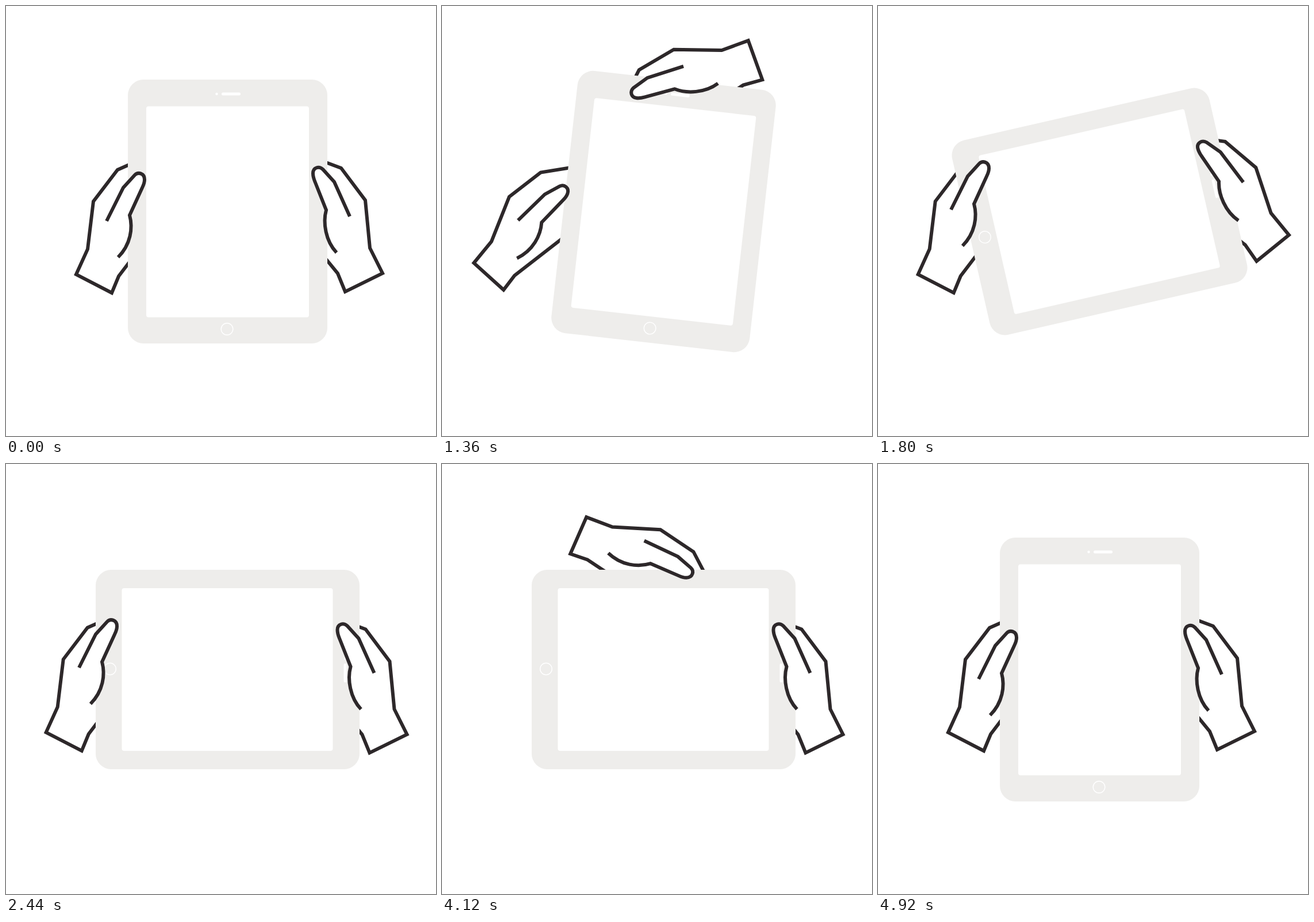
Animation, 748 px wide and 748 px high, one loop 5960 ms. Source, as an HTML page:

```html
<!DOCTYPE html>
<html lang="en">
<head>
<meta charset="utf-8">
<title>Turning a tablet</title>
<style>
  html, body { margin: 0; width: 100%; height: 100%; overflow: hidden; background: #fff; }
  svg { display: block; width: 100%; height: 100%; }
  .hand { fill: none; stroke: #2d282a; stroke-width: 6; stroke-miterlimit: 8; }
  .thumb { fill: #fff; }
</style>
</head>
<body>
<svg viewBox="0 0 748 748">
  <path id="leftPalm" class="hand" d="M266 253L194 285L152 340L142 423L122 467L184 499L196 470L260 386"/>
  <path id="rightPalm" class="hand" d="M523 259.5L583 282L625 338L633 421L655 465L590 497L577 465L505 377"/>
  <g id="tablet">
    <rect x="212" y="128" width="347" height="459" rx="27" fill="#eeedeb"/>
    <rect x="244" y="174.5" width="283" height="367" rx="4" fill="#fff"/>
    <circle cx="366.5" cy="153" r="2.2" fill="#fff"/>
    <rect x="375" y="150.5" width="33" height="5" rx="2.5" fill="#fff"/>
    <circle cx="384.5" cy="562" r="10.3" fill="none" stroke="#fff" stroke-width="1.4"/>
  </g>
  <path id="leftThumb" class="hand thumb" d="M175 374L204 316L224 294C230 288 241 291 241 302C241 308 239 312 237 316L215 364C221 386 217 415 195 437"/>
  <path id="rightThumb" class="hand thumb" d="M598 366L571 306L551 284C544 278 534 281 534 291C534 298 536 302 538 307L557 355C551 377 556 409 575 429"/>
</svg>
<script>
const LOOP = 5960, STEP = 40;
const CX = 385.5, CY = 357.5;
const TURN = [1320, 1880], BACK = [4168, 4838];
const GRAB = 1360; // right hand takes hold just after the turn begins

// Rest poses in portrait: x, y, angle
const rest = {
  leftPalm: [165, 414, 0],
  leftThumb: [197.25, 372.75, 0],
  rightPalm: [610.5, 411.3, 0],
  rightThumb: [575.25, 364, 0]
};

// Landscape poses
const wide = {
  leftPalm: [112.7, 413.8, 0],
  leftThumb: [149.25, 353, 0],
  rightPalm: [653, 416.8, 0],
  rightThumb: [617.75, 361.5, 0]
};

// Offsets of the left hand along the tablet while it turns back: halfway, start
const slide = {
  leftPalm: [[7.4, -29], [7, -12]],
  leftThumb: [[0, -28], [0, -12]]
};

const clamp01 = v => Math.max(0, Math.min(1, v));
const part = (t, [a, b]) => clamp01((t - a) / (b - a));
const tilt = t => 90 * (part(t, TURN) - part(t, BACK));

// Rotate a pose about the tablet centre
function spin([x, y, a], deg) {
  const r = deg * Math.PI / 180, c = Math.cos(r), s = Math.sin(r);
  const dx = x - CX, dy = y - CY;
  return [CX + dx * c - dy * s, CY + dx * s + dy * c, a + deg];
}

const key = (t, p) => [t, ...p];
const landed = name => spin(wide[name], tilt(GRAB) - 90);

// Parabola through 0 at u=0, m at u=.533 and e at u=1
function bow(u, m, e) {
  const h = 0.533, b = (m - e * h) / (h * h - h);
  return (e - b) * u + b * u * u;
}

function slid(name, deg) {
  const [mid, end] = slide[name], [x, y, a] = rest[name], u = deg / 90;
  return spin([x + bow(u, mid[0], end[0]), y + bow(u, mid[1], end[1]), a], deg);
}

const tracks = {
  leftPalm: [
    key(1200, rest.leftPalm), [1500, 66, 398, 27], [1600, 71.5, 394.8, 25], key(1800, wide.leftPalm),
    key(3560, wide.leftPalm), [3600, 111.2, 405.3, 2], [3740, 104, 275, 42], [3900, 150, 150, 66],
    [4040, 250, 118, 80], key(BACK[0], slid("leftPalm", 90))
  ],
  leftThumb: [
    key(1200, rest.leftThumb), [1500, 118, 384, 35], [1600, 122.75, 380.75, 33.5], key(1800, wide.leftThumb),
    key(3560, wide.leftThumb), [3600, 148.75, 348.25, 2.9], [3740, 173, 257, 52], [3900, 226, 158, 75],
    [4040, 306, 140, 86], key(BACK[0], slid("leftThumb", 90))
  ],
  rightPalm: [
    key(600, rest.rightPalm), [800, 626, 240, -42], [1000, 600.5, 129, -69.2], [1200, 543, 111, -80],
    key(GRAB, landed("rightPalm")), key(TURN[1], wide.rightPalm), key(4160, wide.rightPalm),
    [4360, 672, 438, 4.5], [4480, 663.9, 441, 3.6], [4760, 614, 413, 0.5], key(4840, rest.rightPalm)
  ],
  rightThumb: [
    key(600, rest.rightThumb), [800, 550, 224, -52], [1000, 510.5, 131, -84.6], [1200, 468, 129, -85],
    key(GRAB, landed("rightThumb")), key(TURN[1], wide.rightThumb), key(4160, wide.rightThumb),
    [4360, 635, 372, -11], [4480, 626.5, 372.5, -10.9], [4760, 578, 365, -1], key(4840, rest.rightThumb)
  ]
};

// Monotone cubic interpolation
function follow(keys, t) {
  const last = keys.length - 1;
  if (t <= keys[0][0]) return keys[0].slice(1);
  if (t >= keys[last][0]) return keys[last].slice(1);
  let i = 0;
  while (t >= keys[i + 1][0]) i++;
  const span = keys[i + 1][0] - keys[i][0], u = (t - keys[i][0]) / span;
  const slope = (n, d) => (keys[n + 1][d] - keys[n][d]) / (keys[n + 1][0] - keys[n][0]);
  const tangent = (n, d) => {
    if (n === 0) return 0;
    if (n === last) return slope(n - 1, d);
    const a = slope(n - 1, d), b = slope(n, d);
    return a * b > 0 ? 2 * a * b / (a + b) : 0;
  };
  const rise = u * u * (3 - 2 * u);
  return [1, 2, 3].map(d =>
    keys[i][d] + (keys[i + 1][d] - keys[i][d]) * rise +
    span * u * (1 - u) * ((1 - u) * tangent(i, d) - u * tangent(i + 1, d)));
}

function poseOf(name, t, deg) {
  if (slide[name]) {
    if (t >= BACK[0]) return slid(name, deg);
  } else if (t >= GRAB && t < TURN[1]) {
    return spin(wide[name], deg - 90);
  }
  return follow(tracks[name], t);
}

const el = id => document.getElementById(id);

function draw(t) {
  const deg = tilt(t);
  el("tablet").setAttribute("transform", `rotate(${deg} ${CX} ${CY})`);
  for (const name in rest) {
    const [x, y, a] = poseOf(name, t, deg), [px, py] = rest[name];
    el(name).setAttribute("transform", `translate(${x} ${y}) rotate(${a}) translate(${-px} ${-py})`);
  }
}

const start = performance.now();
function tick() {
  const t = (performance.now() - start) % LOOP;
  draw(Math.floor(t / STEP) * STEP);
  requestAnimationFrame(tick);
}
tick();
</script>
</body>
</html>
```
